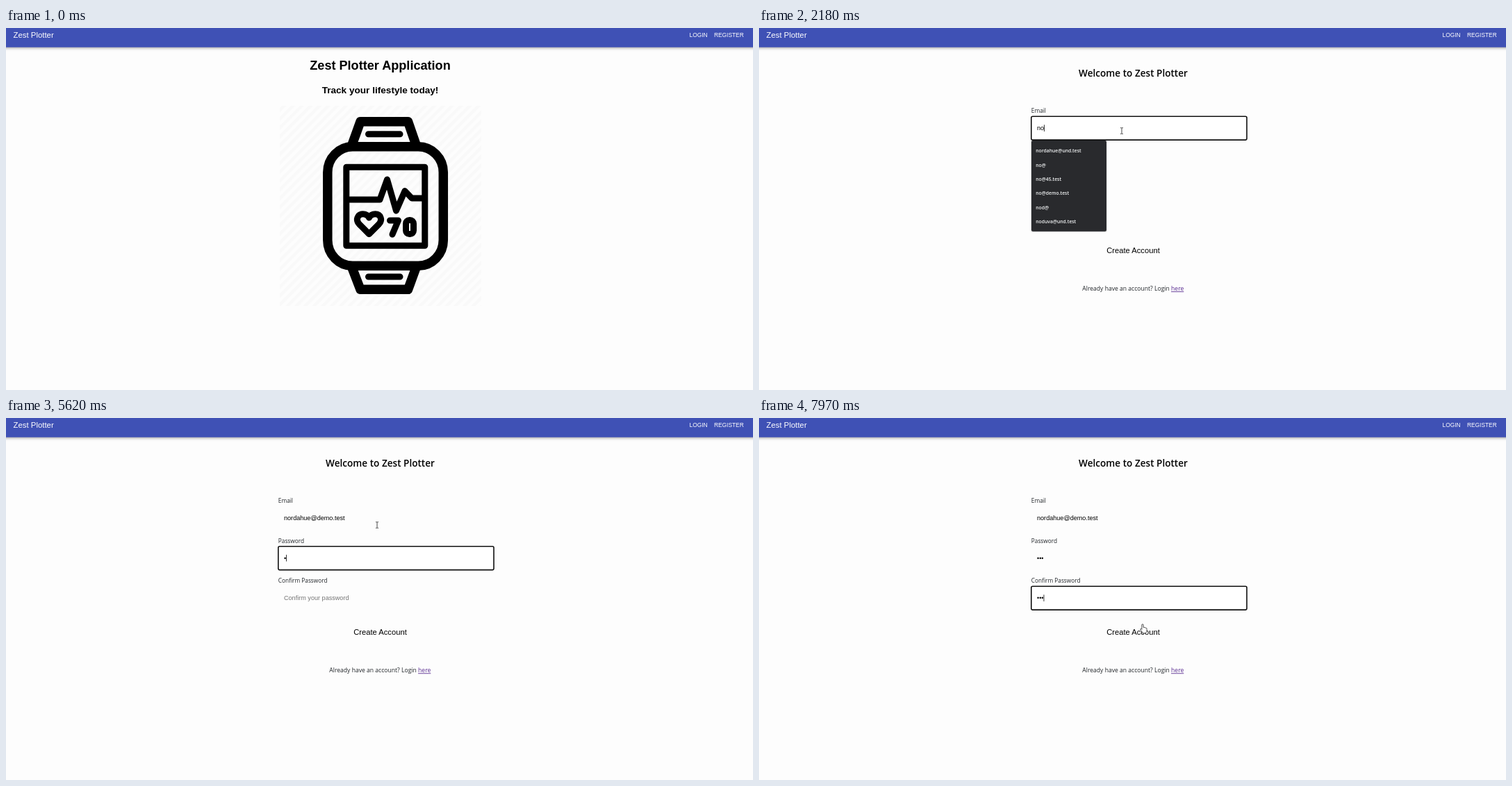
Animation, 1075 px wide and 521 px high, one loop 8000 ms. Source, as an HTML page:

```html
<!DOCTYPE html>
<html lang="en">
<head>
<meta charset="utf-8">
<title>Zest Plotter</title>
<style>
html, body { margin: 0; width: 100%; height: 100%; overflow: hidden; background: #fdfdfd; }
svg { display: block; width: 100vw; height: 100vh; }
text { white-space: pre; }
.arial { font-family: "Liberation Sans", Arial, sans-serif; }
.ui { font-family: "Open Sans", "Noto Sans", sans-serif; fill: #212529; }
.mid { text-anchor: middle; }
.input { font-size: 9.1px; }
.label { font-size: 8.3px; }
.row { font-size: 6.8px; font-weight: 600; fill: #f1f3f4; }
.bar { fill: #3f51b5; filter: drop-shadow(0 1.5px 2px rgba(0,0,0,.4)); }
.ink { fill: none; stroke: #000; stroke-linecap: round; stroke-linejoin: round; }
.panel { fill: #292a2d; filter: drop-shadow(0 .7px 1px rgba(0,0,0,.35)); }
</style>
</head>
<body>
<svg viewBox="0 0 1075 521" preserveAspectRatio="none">
  <defs>
    <pattern id="stripes" width="9" height="9" patternUnits="userSpaceOnUse" patternTransform="rotate(45)">
      <rect width="4.5" height="9" fill="#f9f9f9"/>
    </pattern>
  </defs>
  <rect width="1075" height="521" fill="#fdfdfd"/>

  <rect class="bar" x="-10" y="-10" width="1095" height="37.7"/>
  <rect id="hoverLogin" x="979" y="1" width="35" height="19" rx="2.5" opacity=".06"/>
  <rect id="hoverRegister" x="1014" y="1" width="53" height="19" rx="2.5" opacity=".06"/>
  <g class="arial" fill="#fff">
    <text x="10.5" y="14" font-size="11.4">Zest Plotter</text>
    <text x="983.6" y="13" font-size="8.35">LOGIN</text>
    <text x="1019" y="13" font-size="8.35">REGISTER</text>
  </g>

  <g id="home">
    <g class="arial mid" font-weight="700">
      <text x="538.5" y="60" font-size="18.1">Zest Plotter Application</text>
      <text x="538.5" y="94.2" font-size="13.6">Track your lifestyle today!</text>
    </g>
    <rect x="394" y="112" width="290" height="288" fill="url(#stripes)"/>
    <g class="ink" stroke-width="13.5">
      <path d="M498 168L510 134.7H578.5L590 168M498 345L510 376.3H578.5L590 345" stroke-linecap="butt"/>
      <rect x="462.8" y="170.8" width="166.5" height="171.5" rx="36" ry="37"/>
    </g>
    <g class="ink" stroke-width="9">
      <path d="M521.5 152.7H567M521.5 358H567"/>
      <rect x="489.8" y="200.3" width="113" height="113"/>
      <path d="M495 247H538L548.5 218L561.5 263L574 234.5L584 245H600"/>
      <path d="M522.5 296.5L508.5 282.5C502.5 276 506 267.8 513.5 267.8C518 267.8 521 270 522.5 273C524 270 527 267.8 531.5 267.8C539 267.8 542.5 276 536.5 282.5Z"/>
      <path d="M552.5 277H564.5L556 297"/>
      <rect x="575.5" y="276.5" width="11" height="20" rx="5"/>
    </g>
  </g>

  <g id="form">
    <text class="ui mid" x="538.5" y="70" font-size="13.6" font-weight="600" style="fill:#000">Welcome to Zest Plotter</text>
    <g id="fields"></g>
    <text id="error" class="ui" x="391.8" y="286" font-size="8.4" style="fill:#dc2a3c">Passwords do not match.</text>
    <g id="foot">
      <text class="arial mid" x="538.5" y="312.3" font-size="11.2">Create Account</text>
      <text class="ui mid" x="538.3" y="366.3" font-size="8.6">Already have an account? Login <tspan fill="#5a2d91" text-decoration="underline">here</tspan></text>
    </g>
    <g id="emailPanel">
      <rect class="panel" x="392" y="162" width="108" rx="2"/>
    </g>
    <g id="savedPanel">
      <rect class="panel" x="392.5" y="277" width="194" height="23" rx="2"/>
      <text class="ui row" x="413" y="291">Use a password saved to your account</text>
    </g>
  </g>

  <g id="pointer">
    <path id="arrow" d="M0 0V11L2.6 8.6L4.3 12.3L6 11.5L4.4 7.9H7.8Z" fill="#fff" stroke="#000" stroke-width=".8"/>
    <path id="beam" d="M-2 -4.3H-.6L0 -3.8L.6 -4.3H2M0 -3.8V3.8M-2 4.3H-.6L0 3.8L.6 4.3H2" fill="none" stroke="#333" stroke-width=".9"/>
    <path id="hand" d="M-1.1 .8Q-1 -.3 0 -.3T1.1 .8V4.3Q2.2 3.7 2.9 4.7Q4 4.1 4.6 5.2Q6 4.9 6.1 6.3V8.7Q6 10.5 5 11.6V12.7H-.2V11.5L-3 8Q-3.7 6.7 -2.7 6.3Q-1.9 6.2 -1.1 7.3Z" fill="#fff" stroke="#222" stroke-width=".8"/>
  </g>
</svg>
<script>
const LOOP = 8000, STEP = 78.125, SHIFT = 11.9;
const $ = id => document.getElementById(id);
const clamp = v => Math.max(0, Math.min(1, v));
const show = (el, on) => el.setAttribute("display", on ? "inline" : "none");
const move = (el, x, y) => el.setAttribute("transform", `translate(${x} ${y})`);

function add(parent, tag, attrs, text = "") {
  const el = document.createElementNS("http://www.w3.org/2000/svg", tag);
  for (const key in attrs) el.setAttribute(key, attrs[key]);
  el.textContent = text;
  return parent.appendChild(el);
}

function makeField(i, label, hint) {
  const g = add($("fields"), "g", {}), y = i * 57.5;
  return {
    g, hint,
    ring: add(g, "rect", { x: 391.8, y: 127.3 + y, width: 310.2, height: 33.8, rx: 2, fill: "#fff", stroke: "#101010", "stroke-width": 1.6 }),
    label: add(g, "text", { class: "ui label", x: 391.8, y: 122.2 + y }, label),
    value: add(g, "text", { class: "arial input", x: 400, y: 147.2 + y }),
    caret: add(g, "rect", { y: 139.3 + y, width: .8, height: 9.6 })
  };
}

const fields = [
  makeField(0, "Email", "Enter a valid email"),
  makeField(1, "Password", "Enter a secure password"),
  makeField(2, "Confirm Password", "Confirm your password")
];

// Key presses: [time, characters so far]
const address = "nordahue@demo.test";
const emailKeys = [[2020, 1], [2180, 2], [2340, 3], [2800, 4], [2960, 6], [3120, 8], [3270, 9], [3650, 10],
  [3730, 11], [3810, 12], [3890, 13], [4050, 14], [4200, 15], [4360, 17], [4520, 18]];
const passKeys = [[5540, 1], [5700, 2], [5860, 3]];
const confirmKeys = [[6940, 1], [7340, 2], [7570, 3]];
const typed = (keys, t) => keys.reduce((n, [at, count]) => t >= at ? count : n, 0);

const matches = ["nordahue@und.test", "no@", "no@45.test", "no@demo.test", "nod@", "noduva@und.test"];
const rows = matches.map((m, i) => add($("emailPanel"), "text", { class: "ui row", x: 398.3, y: 179.3 + i * 20.3 }, m));

// Pointer stops: [time, x, y]
const path = [[70, 1003, 512], [580, 1000, 13], [860, 1035, 12], [1010, 1035, 12], [1710, 522, 148], [5380, 522, 148],
  [5620, 534, 154], [5940, 590, 182], [6010, 590, 182], [6560, 542, 261], [7560, 542, 261], [7960, 552, 297]];

function pointerAt(t) {
  const i = path.findIndex(p => p[0] > t);
  if (i < 1) return path[i < 0 ? path.length - 1 : 0].slice(1);
  const [t0, x0, y0] = path[i - 1], [t1, x1, y1] = path[i];
  const u = (t - t0) / (t1 - t0), e = u * u * (3 - 2 * u);
  return [x0 + (x1 - x0) * e, y0 + (y1 - y0) * e];
}

function drawPointer(t, onForm) {
  const [x, y] = pointerAt(t);
  const inNav = y < 20 && x > 979;
  const inField = onForm && x > 392 && x < 702 && [144, 201.5, 259].some(c => Math.abs(y - c) < 17);
  const inButton = onForm && y > 293 && y < 324 && x > 490 && x < 587;
  const hand = inNav || inButton;
  show($("pointer"), t >= 70);
  move($("pointer"), x, y);
  show($("hand"), hand);
  show($("beam"), inField);
  show($("arrow"), !hand && !inField);
  show($("hoverLogin"), inNav && x < 1014);
  show($("hoverRegister"), inNav && x >= 1014);
}

function drawField(f, text, focused) {
  f.value.textContent = text || f.hint;
  f.value.setAttribute("fill", text ? "#000" : "#757575");
  show(f.ring, focused);
  show(f.caret, focused);
  if (focused) f.caret.setAttribute("x", 400 + (text ? f.value.getComputedTextLength() : 0));
}

function drawPanel(el, t, from, fadeAt, fadeTime, cx, cy) {
  const fade = clamp((t - fadeAt) / fadeTime), s = 1 - .04 * fade;
  show(el, t >= from && fade < 1);
  el.setAttribute("opacity", 1 - fade);
  el.setAttribute("transform", `translate(${cx * (1 - s)} ${cy * (1 - s)}) scale(${s})`);
}

function draw(ms) {
  const t = ms % LOOP, stepTime = Math.floor((t + 9) / STEP) * STEP;
  const onForm = t >= 940;
  show($("home"), !onForm);
  show($("form"), onForm);

  const focus = t < 1790 ? -1 : t < 4990 ? 0 : t < 6560 ? 1 : 2;
  const values = [
    address.slice(0, typed(emailKeys, t)),
    "•".repeat(typed(passKeys, t)),
    "•".repeat(typed(confirmKeys, t))
  ];
  fields.forEach((f, i) => drawField(f, values[i], focus === i));

  const badEmail = t >= 2020 && t < 3270, mismatch = t >= 6940 && t < 7570;
  fields.slice(1).forEach(f => move(f.g, 0, badEmail ? SHIFT : 0));
  move($("foot"), 0, badEmail || mismatch ? SHIFT : 0);
  show($("error"), mismatch);

  const count = t < 2340 ? 6 : t < 2800 ? 2 : 1, height = 9 + count * 20.3;
  $("emailPanel").firstElementChild.setAttribute("height", height);
  rows.forEach((r, i) => {
    r.textContent = count === 2 && i === 1 ? "nor@" : matches[i];
    show(r, i < count);
  });
  drawPanel($("emailPanel"), stepTime, 1790, 3650, 215, 446, 162 + height / 2);
  drawPanel($("savedPanel"), stepTime, 6640, 6940, 175, 489.5, 288.5);
  drawPointer(stepTime, onForm);
}

const start = performance.now();
function tick() {
  draw(performance.now() - start);
  requestAnimationFrame(tick);
}
tick();
</script>
</body>
</html>
```
